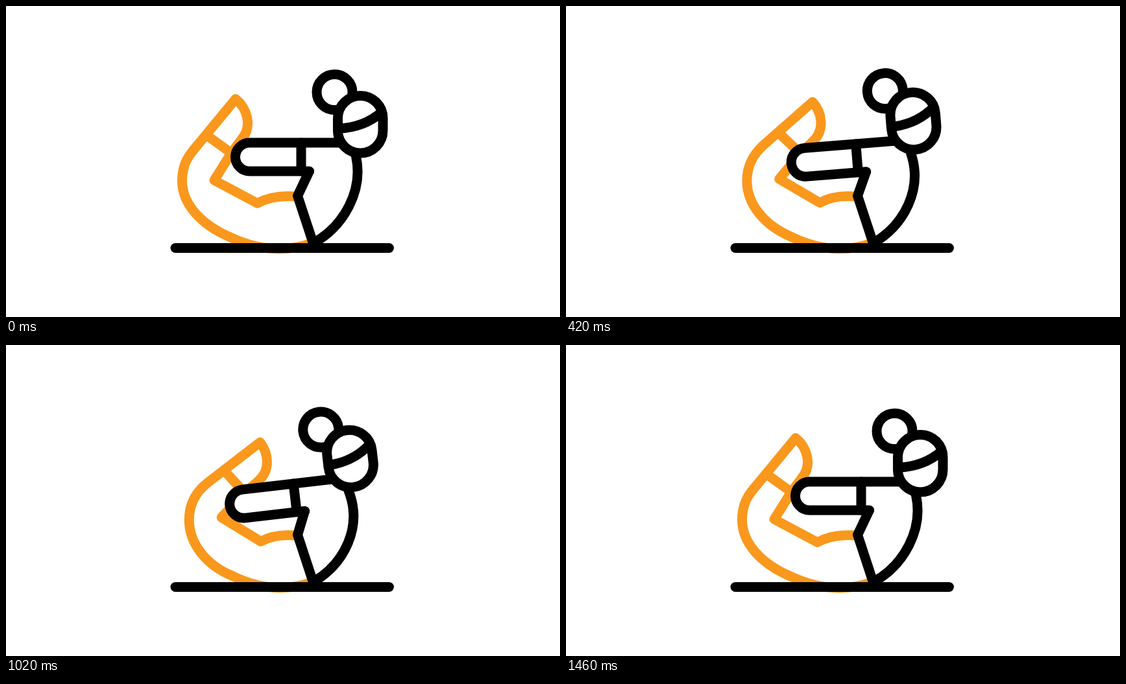
Write an HTML page that moves like this. It is 854 px wide and 480 px high and loops after 1480 ms.

```html
<!DOCTYPE html>
<html lang="en">
<head>
<meta charset="utf-8">
<title>Bow pose</title>
<style>
  html, body { margin: 0; width: 100%; height: 100%; overflow: hidden; background: #fff; }
  svg { display: block; width: 100%; height: 100%; }
  path, circle, rect { fill: none; stroke: #000; stroke-width: 15; stroke-linecap: round; stroke-linejoin: round; }
  .accent { stroke: #f9981d; }
  .solid { fill: #fff; }
</style>
</head>
<body>
<svg viewBox="0 0 854 480">
  <g id="rays"></g>
  <path id="leg" class="accent"/>
  <path id="torso"/>
  <g id="upper">
    <path class="solid" d="M514 211H375.500A22 22 0 0 0 375.500 255H467.500"/>
    <path d="M455 211V255"/>
    <circle cx="506.500" cy="133" r="27.500"/>
    <rect class="solid" x="511.500" y="138.500" width="69.500" height="88.500" rx="34.750"/>
    <path d="M512 189Q551 188 579 164"/>
  </g>
  <path d="M261 373.500H590.500"/>
</svg>
<script>
const LOOP = 1480, PEAK = 760, HOLD = 40, MOVE = 630;
const $ = id => document.getElementById(id);
const clamp = x => Math.min(1, Math.max(0, x));
const ramp = (t, from, to) => clamp((t - from) / (to - from));
const lerp = (a, b, k) => a + (b - a) * k;
const easeInOut = u => u < .5 ? 4 * u ** 3 : 1 - 4 * (1 - u) ** 3;

// Path pairs share their commands: relaxed pose, then stretched pose.
const leg = [
  `M474 365C440 378 397 381 345 356.5C300 337 271.5 305 271.5 270C271.5 243 282 230 295 215
   L354 143.5C371 157 381 185 363 206L346 229L321 269L387.5 304.5Q412 291 447 294M310 200L346 226`,
  `M474 365C440 378 400 381 350 356.5C308 339 284.5 305 284.5 270C284.5 246 295 226 314 212
   L399.5 151.5C411 168 415 195 393 212L371 229L334.5 265.5L394 303Q415 291 447 294M345 196L371 227`
];
const torso = [
  'M467.5 255L449.5 293L473.5 366C521 340 551 285 539.5 232',
  'M459 256.5L449.5 293L473.5 366C522 337 550 280 525.5 223'
];
const rays = [[362, 130, 326, 93.5], [395.5, 121.5, 396, 75.5], [428, 126, 458, 94.5]];

function morph([from, to], k) {
  const ends = to.match(/[\d.]+/g);
  let i = 0;
  return from.replace(/[\d.]+/g, n => lerp(+n, +ends[i++], k).toFixed(2));
}

const rayPaths = rays.map(() => {
  const path = document.createElementNS('http://www.w3.org/2000/svg', 'path');
  path.setAttribute('class', 'accent');
  return $('rays').appendChild(path);
});

function draw(t) {
  const k = easeInOut(clamp(1 - (Math.abs(t - PEAK) - HOLD) / MOVE));
  $('leg').setAttribute('d', morph(leg, k));
  $('torso').setAttribute('d', morph(torso, k));
  $('upper').setAttribute('transform', `rotate(${-8 * k} 475 315)`);

  const head = ramp(t, 430, 590), tail = ramp(t, 550, 710);
  rays.forEach(([x0, y0, x1, y1], i) => {
    const at = u => `${lerp(x0, x1, u)} ${lerp(y0, y1, u)}`;
    rayPaths[i].setAttribute('d', head > tail ? `M${at(tail)}L${at(head)}` : '');
  });
}

function tick() {
  draw(performance.now() % LOOP);
  requestAnimationFrame(tick);
}
tick();
</script>
</body>
</html>
```
